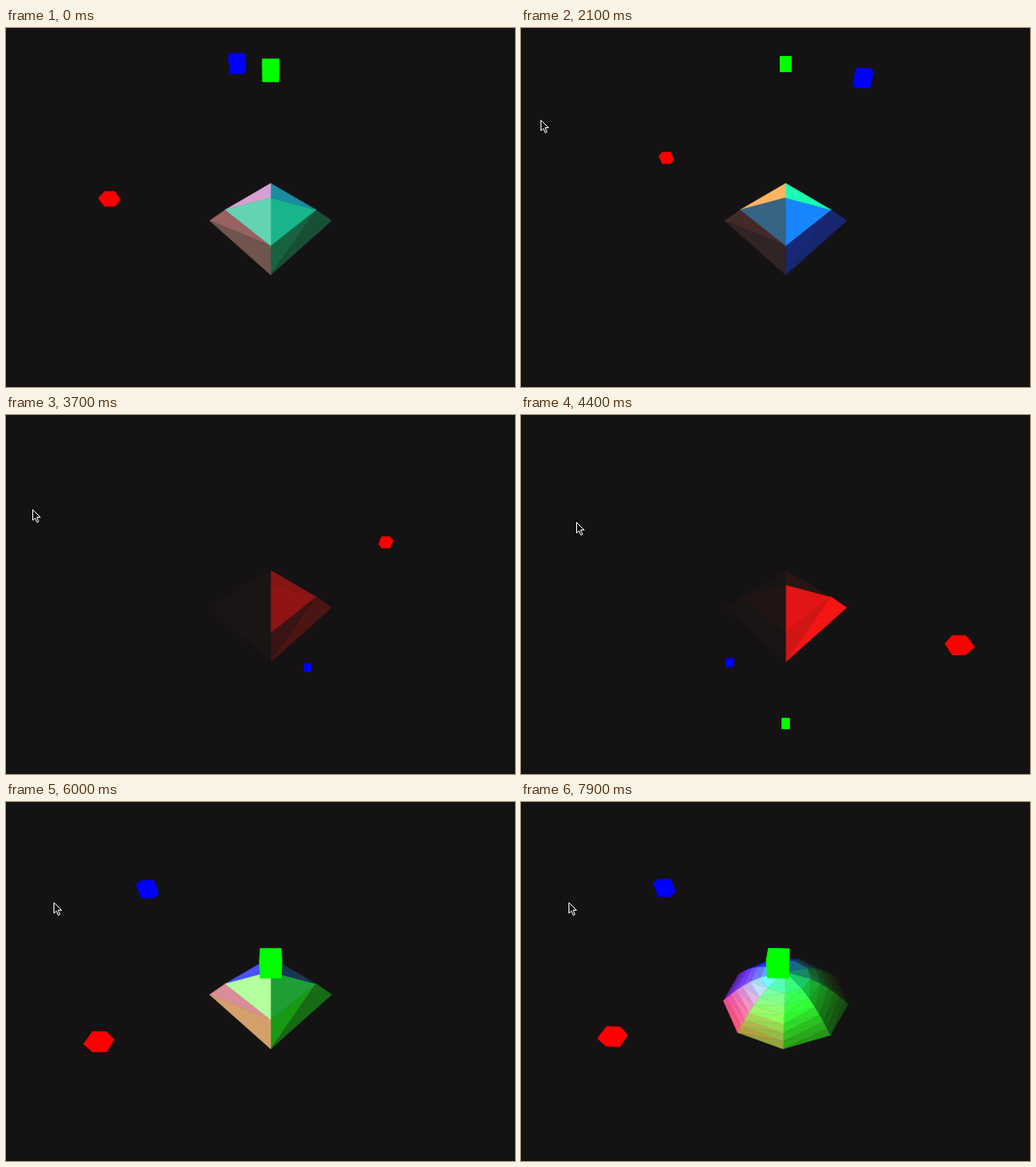
Recreate the animation shown at these times as an HTML page with a canvas. Size 600x423 px, loop 8 s.

```html
<!DOCTYPE html>
<html>
<head>
<meta charset="utf-8">
<style>
html, body { margin: 0; height: 100%; overflow: hidden; background: #141213; }
canvas { display: block; }
</style>
</head>
<body>
<canvas id="stage" width="600" height="423"></canvas>
<script>
const ctx = document.getElementById('stage').getContext('2d');
const LOOP = 8000, STEP = 100;
const RAD = Math.PI / 180;
const BACK = '#141213';

// The camera looks down at 45 degrees on the centre of the dome's base.
const DIST = 3.46, FOCAL = 249, TILT = Math.SQRT1_2;
const CENTER = { x: 312, y: 227 };
const HEIGHT = 0.479, ORBIT = 2.11, RED_LEVEL = 0.71, CUBE = 0.134;
const AMBIENT = [24, 21, 20];
const COLORS = ['#f00', '#0f0', '#00f'];

// Key points of the pointer tip: second, x, y
const POINTER = [
  [1.6, -20, 72], [2.1, 23, 108], [2.9, 18, 116], [3.4, 22, 107],
  [4.4, 65, 126], [5.2, 35, 101], [5.8, 56, 118]
];

let yaw = 0;

const clamp = (v, lo, hi) => Math.min(hi, Math.max(lo, v));
const mix = (a, b, k) => a + (b - a) * k;
const sub = (a, b) => a.map((v, i) => v - b[i]);
const dot = (a, b) => a[0] * b[0] + a[1] * b[1] + a[2] * b[2];
const cross = (a, b) => [
  a[1] * b[2] - a[2] * b[1], a[2] * b[0] - a[0] * b[2], a[0] * b[1] - a[1] * b[0]
];

function project([x, y, z]) {
  const s = Math.sin(yaw), c = Math.cos(yaw);
  const wx = x * c - z * s, wz = x * s + z * c;
  const depth = DIST - (y + wz) * TILT;
  const k = FOCAL / depth;
  return [CENTER.x + wx * k, CENTER.y - (y - wz) * TILT * k, depth];
}

function polygon(points, fill, stroke, width) {
  ctx.beginPath();
  points.forEach(p => ctx.lineTo(p[0], p[1]));
  ctx.closePath();
  ctx.fillStyle = fill;
  ctx.strokeStyle = stroke;
  ctx.lineWidth = width;
  ctx.fill();
  ctx.stroke();
}

// Three circles, one around each axis, share a single angle.
function lightsAt(t) {
  const angle = (-8.5 + 84.7 * clamp(t - 1.752, 0, 3.884)) * RAD;
  const s = ORBIT * Math.sin(angle), c = ORBIT * Math.cos(angle);
  return [[-c, RED_LEVEL, -s], [0, c, -s], [s, c, 0]];
}

function shade(normal, at, lights, gain) {
  const rgb = lights.map((light, i) => {
    const ray = sub(light, at), d2 = dot(ray, ray);
    const lit = Math.max(0, dot(normal, ray)) / Math.sqrt(d2) / d2;
    return Math.round(Math.min(255, AMBIENT[i] + gain * lit));
  });
  return `rgb(${rgb})`;
}

// Flat triangle, lit at a point pulled from its middle to its last corner
function triangle(tri, pull, lights) {
  const [a, b, c] = tri.map(project);
  if ((b[0] - a[0]) * (c[1] - a[1]) <= (b[1] - a[1]) * (c[0] - a[0])) return;
  const n = cross(sub(tri[2], tri[0]), sub(tri[1], tri[0]));
  const len = Math.hypot(...n) * Math.sign(n[1]);
  const at = tri[2].map((v, i) => mix((tri[0][i] + tri[1][i] + v) / 3, v, pull));
  const color = shade(n.map(v => v / len), at, lights, mix(480, 830, pull));
  polygon([a, b, c], color, color, 0.5);
}

// Paraboloid cut into rings of equal height
function dome(segments, stacks, lights) {
  const point = (i, k) => {
    const r = Math.sqrt(1 - i / stacks), a = k / segments * 2 * Math.PI;
    return [r * Math.sin(a), HEIGHT * i / stacks, r * Math.cos(a)];
  };
  for (let i = 0; i < stacks; i++) {
    const pull = ((i + 1) / stacks) ** 2;
    for (let k = 0; k < segments; k++) {
      const low = point(i, k), upNext = point(i + 1, k + 1);
      if (i < stacks - 1) triangle([low, point(i + 1, k), upNext], pull, lights);
      triangle([low, upNext, point(i, k + 1)], pull, lights);
    }
  }
}

function cube(center, color) {
  for (let axis = 0; axis < 3; axis++) {
    for (const side of [-1, 1]) {
      const face = [[-1, -1], [1, -1], [1, 1], [-1, 1]].map(([u, v]) => {
        const p = [...center];
        p[axis] += side * CUBE / 2;
        p[(axis + 1) % 3] += u * CUBE / 2;
        p[(axis + 2) % 3] += v * CUBE / 2;
        return project(p);
      });
      polygon(face, color, color, 0.5);
    }
  }
}

function pointer(t) {
  const last = POINTER.length - 1;
  const i = clamp(POINTER.findLastIndex(p => p[0] <= t), 0, last - 1);
  const [t0, x0, y0] = POINTER[i], [t1, x1, y1] = POINTER[i + 1];
  const k = clamp((t - t0) / (t1 - t0), 0, 1);
  const ease = k * k * (3 - 2 * k);
  const x = Math.round(mix(x0, x1, ease)) + 0.5, y = Math.round(mix(y0, y1, ease)) + 0.5;
  const arrow = [[0, 0], [0, 12.5], [3, 10], [5, 15], [7, 14], [5, 9], [9, 9]];
  polygon(arrow.map(p => [x + p[0], y + p[1]]), BACK, '#fff', 1);
}

function draw(now) {
  const t = Math.floor(now % LOOP / STEP) * STEP / 1000;
  yaw = 2 * RAD * clamp((t - 7.2) / 0.7, 0, 1);
  ctx.fillStyle = BACK;
  ctx.fillRect(0, 0, 600, 423);

  const refine = Math.max(0, t - 6.35);
  const segments = Math.floor(Math.min(9, 4 + 7.5 * refine));
  const stacks = Math.floor(Math.min(7, 2 + 10 * refine));
  const lights = lightsAt(t);
  const cubes = lights
    .map((pos, i) => ({ pos, color: COLORS[i], depth: project(pos)[2] }))
    .sort((a, b) => b.depth - a.depth);

  cubes.filter(c => c.depth > DIST).forEach(c => cube(c.pos, c.color));
  dome(segments, stacks, lights);
  cubes.filter(c => c.depth <= DIST).forEach(c => cube(c.pos, c.color));
  pointer(t);
}

const start = performance.now();
function tick() {
  draw(performance.now() - start);
  requestAnimationFrame(tick);
}
tick();
</script>
</body>
</html>
```
